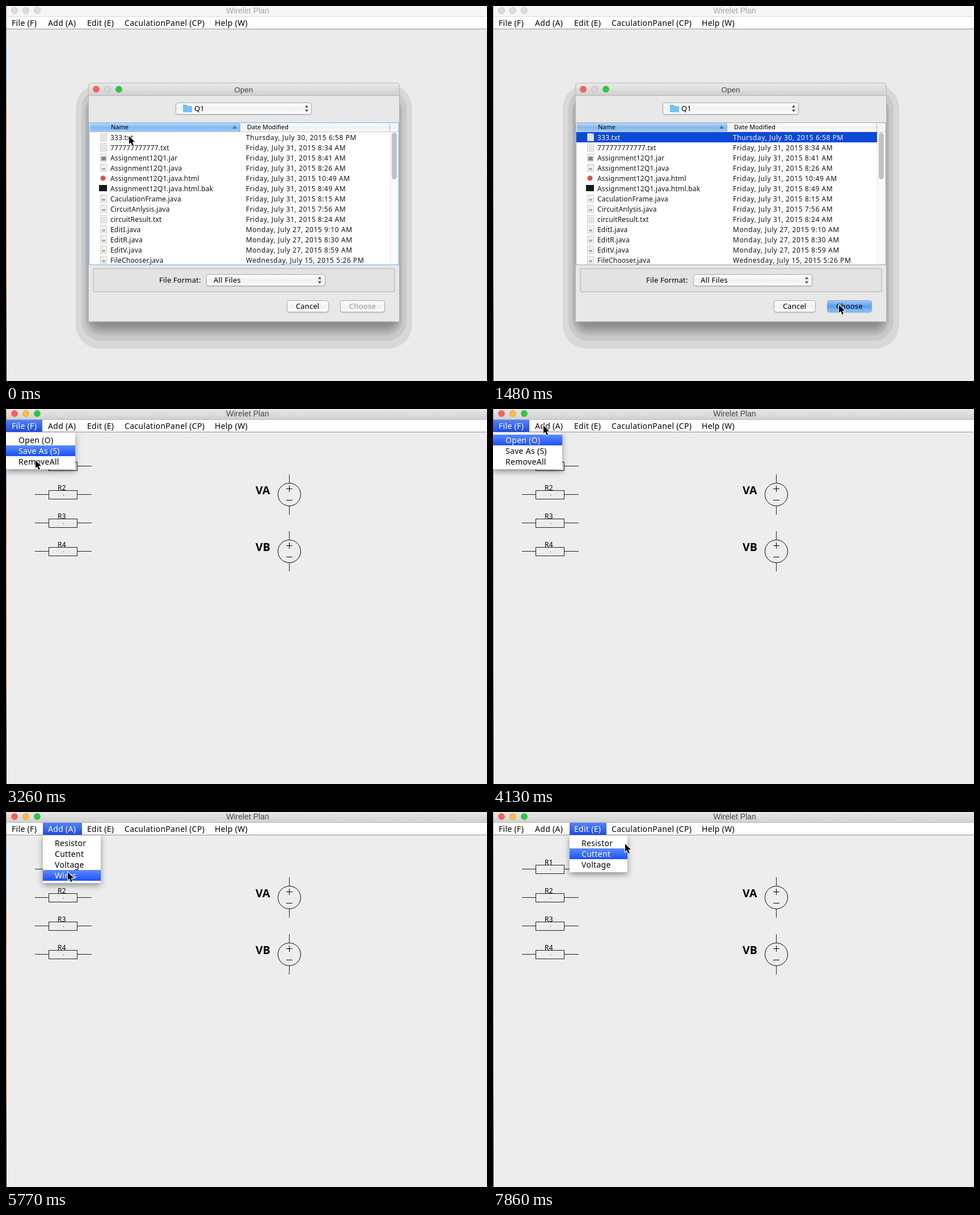
An HTML page with a canvas that plays this animation: 848x660 px, repeating every 8000 ms.

```html
<!DOCTYPE html>
<html lang="en">
<head>
<meta charset="utf-8">
<title>Wirelet Plan</title>
<style>
html, body { margin: 0; width: 100%; height: 100%; overflow: hidden; background: #ededed; }
canvas { display: block; }
</style>
</head>
<body>
<canvas id="stage" width="848" height="660"></canvas>
<script>
const ctx = document.getElementById('stage').getContext('2d');
const LOOP = 8000, STEPS = 54;
const UI = '"Noto Sans", sans-serif', TITLE = '"Liberation Sans", sans-serif';

// Pointer path: step, x, y
const pointerKeys = [
  [0, 217, 229], [3, 217, 231], [8, 610, 526], [10, 610, 526], [16, 38, 34],
  [17, 40, 38], [18, 40, 46], [22, 52, 90], [25, 58, 88], [28, 89, 29],
  [30, 92, 34], [32, 95, 54], [34, 96, 58], [38, 108, 104], [39, 109, 106],
  [41, 110, 108], [43, 140, 40], [45, 165, 47], [46, 173, 53], [47, 173, 53],
  [50, 185, 92], [53, 233, 56]
];

const menus = [
  { label: 'File (F)', x: 10, left: 0, tab: 64, width: 122, items: ['Open (O)', 'Save As (S)', 'RemoveAll'] },
  { label: 'Add (A)', x: 74, left: 65, tab: 69, width: 102, items: ['Resistor', 'Cuttent', 'Voltage', 'Wires'] },
  { label: 'Edit (E)', x: 143, left: 135, tab: 65, width: 102, items: ['Resistor', 'Cuttent', 'Voltage'] },
  { label: 'CaculationPanel (CP)', x: 209 },
  { label: 'Help (W)', x: 368 }
];

// Name, icon kind, date
const files = [
  ['333.txt', 'text', 'Thursday, July 30, 2015 6:58 PM'],
  ['777777777777.txt', 'text', 'Friday, July 31, 2015 8:34 AM'],
  ['Assignment12Q1.jar', 'jar', 'Friday, July 31, 2015 8:41 AM'],
  ['Assignment12Q1.java', 'java', 'Friday, July 31, 2015 8:26 AM'],
  ['Assignment12Q1.java.html', 'web', 'Friday, July 31, 2015 10:49 AM'],
  ['Assignment12Q1.java.html.bak', 'bak', 'Friday, July 31, 2015 8:49 AM'],
  ['CaculationFrame.java', 'java', 'Friday, July 31, 2015 8:15 AM'],
  ['CircuitAnlysis.java', 'java', 'Friday, July 31, 2015 7:56 AM'],
  ['circuitResult.txt', 'text', 'Friday, July 31, 2015 8:24 AM'],
  ['EditI.java', 'java', 'Monday, July 27, 2015 9:10 AM'],
  ['EditR.java', 'java', 'Monday, July 27, 2015 8:30 AM'],
  ['EditV.java', 'java', 'Monday, July 27, 2015 8:59 AM'],
  ['FileChooser.java', 'java', 'Wednesday, July 15, 2015 5:26 PM']
];

function rect(x, y, w, h, fill) {
  ctx.fillStyle = fill;
  ctx.fillRect(x, y, w, h);
}

function round(x, y, w, h, radius, fill, stroke) {
  ctx.beginPath();
  ctx.roundRect(x, y, w, h, radius);
  if (fill) { ctx.fillStyle = fill; ctx.fill(); }
  if (stroke) { ctx.strokeStyle = stroke; ctx.stroke(); }
}

function disc(x, y, r, fill, stroke) {
  ctx.beginPath();
  ctx.arc(x, y, r, 0, 7);
  if (fill) { ctx.fillStyle = fill; ctx.fill(); }
  if (stroke) { ctx.strokeStyle = stroke; ctx.stroke(); }
}

function shape(points, fill, stroke) {
  ctx.beginPath();
  points.forEach(([x, y]) => ctx.lineTo(x, y));
  ctx.closePath();
  if (stroke) { ctx.strokeStyle = stroke; ctx.lineWidth = 2; ctx.stroke(); ctx.lineWidth = 1; }
  ctx.fillStyle = fill;
  ctx.fill();
}

function text(str, x, y, size, { color = '#000', spacing = 0, font = UI, weight = 400, align = 'left' } = {}) {
  ctx.font = `${weight} ${size}px ${font}`;
  ctx.letterSpacing = spacing + 'px';
  ctx.textAlign = align;
  ctx.fillStyle = color;
  ctx.fillText(str, x, y);
}

function fade(y0, y1, ...colors) {
  const g = ctx.createLinearGradient(0, y0, 0, y1);
  colors.forEach((c, i) => g.addColorStop(i / (colors.length - 1), c));
  return g;
}

function withShadow(color, blur, dy, draw) {
  ctx.save();
  ctx.shadowColor = color;
  ctx.shadowBlur = blur;
  ctx.shadowOffsetY = dy;
  draw();
  ctx.restore();
}

function drawWindow(active) {
  rect(0, 0, 848, 660, active ? '#ededed' : '#ebebeb');
  rect(0, 0, 848, 18, active ? fade(0, 18, '#e8e8e8', '#d1d1d1') : '#f6f6f6');
  rect(0, 18, 848, 1, active ? '#b4b4b4' : '#dadada');
  rect(0, 19, 848, 21, '#fff');
  rect(0, 40, 848, 1, '#8e8e8e');
  ['#fc605b', '#fdbc40', '#27c93f'].forEach((c, i) =>
    disc(15 + 20 * i, 8, 5.7, active ? c : '#dcdcdc', active ? 'rgba(0,0,0,.12)' : '#cfcfcf'));
  text('Wirelet Plan', 426, 13, 14, { font: TITLE, align: 'center', color: active ? '#444' : '#a5a5a5' });
  rect(0, 0, 1, 660, fade(0, 660, '#d99b6c', '#4aa6d8', '#b07a55', '#c08058', '#a8714c', '#a06a48', '#222', '#111'));
}

function drawResistor(name, y) {
  rect(51, y, 25, 1, '#222');
  rect(126, y, 25, 1, '#222');
  ctx.strokeStyle = '#222';
  ctx.strokeRect(75.5, y - 6.5, 50, 15);
  rect(101, y + 1, 1, 1, '#000');
  text(name, 91, y - 7, 12, { spacing: .2 });
}

function drawSource(name, y) {
  disc(499.5, y + .5, 20, null, '#000');
  rect(499, y - 35, 1, 15, '#222');
  rect(499, y + 20, 1, 16, '#222');
  rect(494, y - 10, 11, 1, '#000');
  rect(499, y - 15, 1, 11, '#000');
  rect(494, y + 10, 11, 1, '#000');
  text(name, 440, y, 19.5, { weight: 700 });
}

function drawCircuit() {
  for (let i = 0; i < 4; i++) drawResistor('R' + (i + 1), 100 + 50 * i);
  drawSource('VA', 150);
  drawSource('VB', 250);
}

function drawMenus(open, row, lit) {
  menus.forEach((m, i) => {
    const on = lit && i === open;
    if (on) rect(m.left, 19, m.tab, 21, fade(19, 40, '#5580fa', '#1d4fee'));
    text(m.label, m.x, 35, 14, { spacing: .3, color: on ? '#fff' : '#000' });
  });
  if (open < 0) return;
  const { left, width, items } = menus[open];
  withShadow('rgba(0,0,0,.4)', 10, 4, () => rect(left, 41, width, items.length * 19 + 8, '#fff'));
  items.forEach((item, i) => {
    const y = 45 + 19 * i;
    if (i === row) rect(left, y, width, 19, fade(y, y + 19, '#5d8bff', '#1b50fa'));
    text(item, Math.max(22, left + 21), y + 15, 14, { spacing: .3, color: i === row ? '#fff' : '#000' });
  });
}

function drawArrows(x, y) {
  shape([[x - 3, y - 2], [x, y - 6], [x + 3, y - 2]], '#444');
  shape([[x - 3, y + 2], [x, y + 6], [x + 3, y + 2]], '#444');
}

function drawButton(x, y, w, blue) {
  withShadow('rgba(0,0,0,.25)', 2, 1, () => round(x + .5, y + .5, w - 1, 20, 4, '#fff'));
  const fill = blue ? fade(y, y + 21, '#a5cbf8', '#5a9df0', '#8cc8ff') : fade(y, y + 21, '#fff', '#f1f1f1', '#fdfdfd');
  round(x + .5, y + .5, w - 1, 20, 4, fill, blue ? '#7ba3da' : '#ababab');
}

function drawIcon(kind, y) {
  if (kind === 'web') return disc(171, y, 4.5, '#dd5144');
  if (kind === 'bak') return rect(164, y - 6, 14, 11, '#15191a');
  shape([[166, y - 7], [174, y - 7], [178, y - 3], [178, y + 7], [166, y + 7]], '#f6f6f6');
  ctx.strokeStyle = '#c6c6c6';
  ctx.strokeRect(166.5, y - 6.5, 11, 13);
  if (kind === 'text') for (let i = -4; i < 6; i += 2) rect(168, y + i, 8, 1, '#d2d2d2');
  if (kind === 'jar') rect(168, y - 2, 8, 7, '#858585');
  if (kind === 'java') {
    rect(168, y - 4, 5, 1, '#d2d2d2');
    rect(169, y, 6, 4, '#9cc296');
  }
}

function drawFileList(selected) {
  rect(146, 205, 547, 251, '#fff');
  rect(148, 206, 264, 15, fade(206, 221, '#b9d8f8', '#83b9f1', '#9ccbf8'));
  rect(413, 206, 279, 15, fade(206, 221, '#fff', '#f1f1f1', '#fbfbfb'));
  rect(147, 221, 545, 1, '#c4c4c4');
  rect(412, 207, 1, 14, '#a5a5a5');
  rect(676, 207, 1, 14, '#b5b5b5');
  text('Name', 185, 217, 11, { weight: 500 });
  text('Date Modified', 425, 217, 11);
  shape([[399, 216], [403, 210], [407, 216]], '#4c7fb8');

  ctx.save();
  ctx.beginPath();
  ctx.rect(147, 222, 545, 233);
  ctx.clip();
  files.forEach(([name, kind, date], i) => {
    const y = 231 + 18 * i, on = selected && i === 0;
    if (on) rect(147, 222, 530, 18, '#0a49d8');
    const color = on ? '#fff' : '#111';
    drawIcon(kind, y);
    text(name, 184, y + 5, 12, { spacing: .2, color });
    text(date, 423, y + 5, 12, { spacing: .58, color });
  });
  rect(677, 222, 15, 233, '#fafafa');
  rect(677, 222, 1, 233, '#e6e6e6');
  round(680, 223, 9, 82, 4.5, '#c2c2c2');
  ctx.restore();

  ctx.strokeStyle = selected ? '#a2a2a2' : '#71aeea';
  ctx.strokeRect(146.5, 205.5, 546, 250);
}

function drawDialogShadow() {
  round(123, 138, 593, 465, 42, '#d8d8d8');
  round(133, 146, 573, 443, 34, '#c9c9c9');
  for (let i = 0; i < 8; i++) {
    const shade = 190 - 7 * i;
    round(139 + 1.5 * i, 156, 560 - 3 * i, 424 - 2.5 * i, 28 - i, `rgb(${shade},${shade},${shade})`);
  }
}

function drawDialog(selected) {
  drawDialogShadow();
  round(145, 136, 549, 420, [5, 5, 0, 0], '#e8e8e8');
  round(145, 136, 549, 21, [5, 5, 0, 0], fade(136, 157, '#e9e9e9', '#d1d1d1'));
  rect(145, 157, 549, 1, '#b3b3b3');
  round(145.5, 135.5, 548, 420, [5, 5, 0, 0], null, '#b8b8b8');
  ['#fc605b', '#d6d6d6', '#27c93f'].forEach((c, i) =>
    disc(159 + 20 * i, 146.5, 5.7, c, 'rgba(0,0,0,.12)'));
  text('Open', 419, 152, 13.5, { font: TITLE, align: 'center', color: '#444' });

  drawButton(299, 170, 240);
  round(312, 174, 7, 5, 1, '#58b4e8');
  round(312, 176, 16, 11, 1, '#72c5f2');
  text('Q1', 332, 185, 13, { spacing: .2 });
  drawArrows(530, 180.5);

  drawFileList(selected);

  ctx.lineWidth = 2;
  round(154, 462, 531, 41, 3, '#e3e3e3', '#c9c9c9');
  ctx.lineWidth = 1;
  text('File Format:', 270, 487, 13, { spacing: .15 });
  drawButton(353, 472, 210);
  text('All Files', 366, 487, 13, { spacing: .3 });
  drawArrows(553, 482.5);
  drawButton(495, 518, 74);
  text('Cancel', 511, 533, 13, { spacing: .15 });
  drawButton(589, 518, 79, selected);
  text('Choose', 605, 533, 13, { spacing: .2, color: selected ? '#000' : '#929292' });
}

function pointerAt(step) {
  const next = pointerKeys.findIndex(k => k[0] > step);
  if (next < 0) return pointerKeys.at(-1).slice(1);
  const [s0, x0, y0] = pointerKeys[next - 1], [s1, x1, y1] = pointerKeys[next];
  const k = (step - s0) / (s1 - s0);
  return [Math.round(x0 + (x1 - x0) * k), Math.round(y0 + (y1 - y0) * k)];
}

function drawPointer([x, y]) {
  const outline = [[0, 0], [0, 14], [3, 11], [5.5, 17], [8, 16], [5.5, 10.5], [10, 10]];
  shape(outline.map(([dx, dy]) => [x + dx, y + dy]), '#000', '#fff');
}

function render(time) {
  const step = Math.min(STEPS - 1, Math.floor(time / LOOP * STEPS + .15));
  const dialog = step < 11;
  const open = step < 17 ? -1 : step < 29 ? 0 : step < 44 ? 1 : 2;
  // The highlight trails the pointer by one step, except in the Add menu.
  const row = Math.floor((pointerAt(Math.max(0, step - (open === 1 ? 0 : 1)))[1] - 45) / 19);
  drawWindow(!dialog);
  if (!dialog) drawCircuit();
  drawMenus(open, row, step > 17);
  if (dialog) drawDialog(step >= 2);
  drawPointer(pointerAt(step));
}

const start = performance.now();
function tick() {
  render((performance.now() - start) % LOOP);
  requestAnimationFrame(tick);
}
tick();
</script>
</body>
</html>
```
